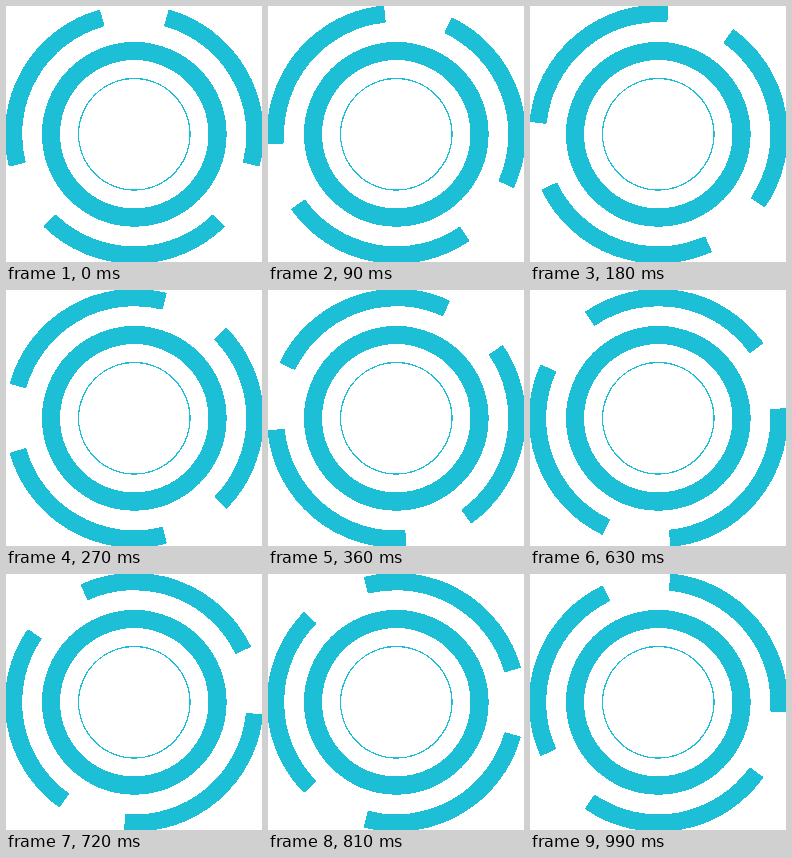
An HTML page with a canvas for the animation above (1080 ms loop, 256 by 256 pixels).

```html
<!DOCTYPE html>
<html lang="en">
<head>
<meta charset="utf-8">
<title>Loader</title>
<style>
  html, body { margin: 0; width: 100%; height: 100%; overflow: hidden; background: #fff; }
  canvas { display: block; width: 256px; height: 256px; image-rendering: pixelated; }
</style>
</head>
<body>
<canvas id="stage" width="256" height="256"></canvas>
<script>
const SIZE = 256, CENTER = 128.26;
const COLOR = '#1dbfd7';
const STEP_MS = 90, STEPS = 12, STEP_DEG = 10;
const OUTER = 129.4, INNER = 112.1, HALF_GAP = 15.4, SOFT = 1;

const ctx = document.getElementById('stage').getContext('2d', { willReadFrequently: true });
const rad = deg => deg * Math.PI / 180;

function ring(outer, inner) {
  ctx.beginPath();
  ctx.arc(CENTER, CENTER, outer, 0, 2 * Math.PI);
  ctx.arc(CENTER, CENTER, inner, 0, 2 * Math.PI, true);
  ctx.fill();
}

// The round-joined outline softens the corners of the band.
function segment(mid) {
  const half = rad(60 - HALF_GAP) - SOFT / ((OUTER + INNER) / 2);
  const a = rad(mid) - half, b = rad(mid) + half;
  ctx.beginPath();
  ctx.arc(CENTER, CENTER, OUTER - SOFT, a, b);
  ctx.arc(CENTER, CENTER, INNER + SOFT, b, a, true);
  ctx.closePath();
  ctx.fill();
  ctx.stroke();
}

// Hard pixel edges: every pixel is either fully covered or empty.
function harden() {
  const img = ctx.getImageData(0, 0, SIZE, SIZE), px = img.data;
  const rgb = [1, 3, 5].map(i => parseInt(COLOR.slice(i, i + 2), 16));
  for (let i = 0; i < px.length; i += 4) {
    const on = px[i + 3] >= 128;
    for (let c = 0; c < 3; c++) px[i + c] = on ? rgb[c] : 255;
    px[i + 3] = 255;
  }
  ctx.putImageData(img, 0, 0);
}

function draw(step) {
  ctx.clearRect(0, 0, SIZE, SIZE);
  ctx.fillStyle = ctx.strokeStyle = COLOR;
  ctx.lineWidth = 2 * SOFT;
  ctx.lineJoin = 'round';
  ring(92.4, 74.2);
  ring(56.4, 55.1);
  for (let i = 0; i < 3; i++) segment(90 + step * STEP_DEG + i * 120);
  harden();
}

const start = performance.now();
let shown = -1;
function tick() {
  const step = Math.floor((performance.now() - start) / STEP_MS) % STEPS;
  if (step !== shown) draw(shown = step);
  requestAnimationFrame(tick);
}
tick();
</script>
</body>
</html>
```
